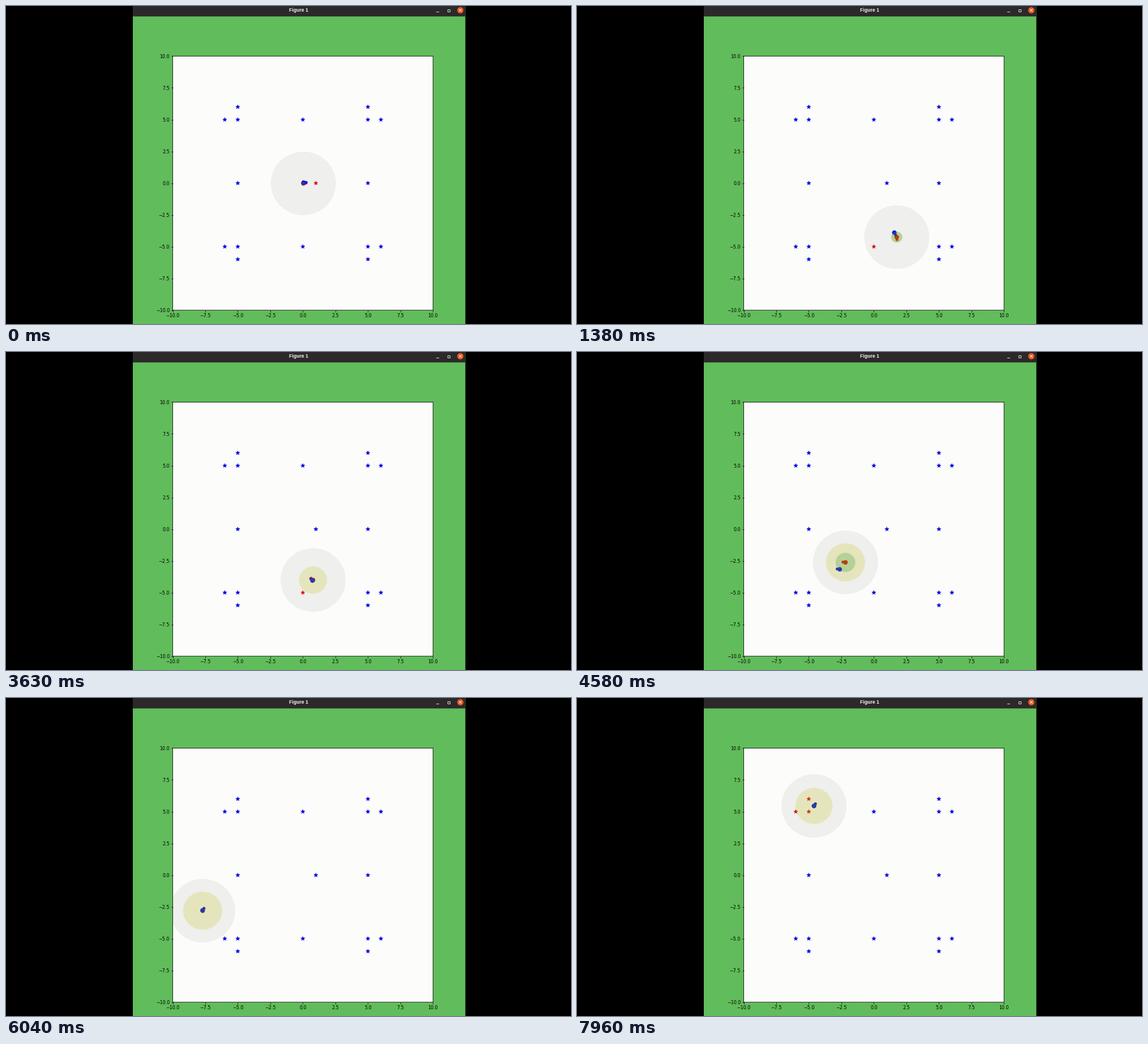
These frames come from a looping animation (998x561 px, 8 s). A matplotlib script:

```python
import numpy as np
import matplotlib.pyplot as plt
from matplotlib.animation import FuncAnimation
from matplotlib.patches import Circle, Rectangle
from matplotlib.ticker import MultipleLocator

W, H, DPI = 998, 561, 100
PX = 72 / DPI            # points per pixel
FRAMES, STEP = 200, 40
RANGE, SPEED, NOSE = 2.5, 4.6, 0.2

plt.rcParams["font.family"] = "DejaVu Sans"
fig = plt.figure(figsize=(W / DPI, H / DPI), dpi=DPI, facecolor="black")

# Desktop window
desk = fig.add_axes([0, 0, 1, 1])
desk.set(xlim=(0, W), ylim=(H, 0))
desk.axis("off")
for height, color in ((H, "#61bc5b"), (18.4, "#2b2929")):
    desk.add_patch(Rectangle((224, 0), 587.4, height, color=color, lw=0, snap=False))
desk.text(516.8, 7.6, "Figure 1", color="#f4f4f2", size=8.6 * PX, weight="bold",
          family="Liberation Sans", ha="center", va="center")
desk.plot([760, 764.5], [9.5, 9.5], color="#dddddd", lw=PX)
desk.add_patch(Rectangle((780.5, 5.5), 4, 4, fill=False, ec="#dddddd", lw=PX))
desk.add_patch(Circle((802.5, 7.5), 5.6, color="#e95420", lw=0))
for s in (-1, 1):
    desk.plot([800.5, 804.5], [7.5 - 2 * s, 7.5 + 2 * s], color="white", lw=0.9 * PX)

# Map
ax = fig.add_axes([294.5 / W, 24.5 / H, 459.7 / W, 448 / H], facecolor="#fcfcfa")
ax.set(xlim=(-10, 10), ylim=(-10, 10))
ax.tick_params(length=2.8 * PX, width=0.8 * PX, pad=2.8 * PX, labelsize=8 * PX)
for axis in (ax.xaxis, ax.yaxis):
    axis.set_major_locator(MultipleLocator(2.5))
for spine in ax.spines.values():
    spine.set(linewidth=0.8 * PX, snap=False)

corners = [(sx * x, sy * y) for sx in (-1, 1) for sy in (-1, 1)
           for x, y in ((5, 5), (6, 5), (5, 6))]
stars = np.array(corners + [(5, 0), (-5, 0), (0, 5), (0, -5), (1, 0)], float)
landmarks = ax.scatter(*stars.T, s=(7.2 * PX) ** 2, marker="*", lw=0.8 * PX, zorder=2)

# True pose in red, estimated pose in blue, each a body and a nose
robots = ax.scatter(np.zeros(4), np.zeros(4), s=(np.array([8, 5, 8, 5]) * PX) ** 2,
                    c=["red", "red", "blue", "blue"], lw=0, zorder=3)
sensor, spread, error = (
    ax.add_patch(Circle((0, 0), 1, fc=color, alpha=alpha, lw=0, zorder=4))
    for color, alpha in (("gray", 0.1), ("y", 0.2), ("g", 0.2)))

# Waypoints: time (s), x, y, heading (deg)
path = np.array([
    (0.00, 0.04, -0.02, 5),
    (1.36, 1.76, -4.25, -85),
    (2.60, 2.89, -7.02, 125),
    (4.56, -2.18, -2.62, 172),
    (6.04, -7.70, -2.80, 57),
    (7.08, -5.93, 1.68, 50),
    (7.96, -4.60, 5.45, 57)])


def pose(t):
    """Cubic Hermite position and heading along the waypoints."""
    i = int(np.clip(np.searchsorted(path[:, 0], t, "right") - 1, 0, len(path) - 2))
    (t0, *p0, a0), (t1, *p1, a1) = path[i], path[i + 1]
    p0, p1, dt = np.array(p0), np.array(p1), t1 - t0
    a = np.radians([a0, a1])
    m0, m1 = SPEED * dt * np.column_stack([np.cos(a), np.sin(a)])
    u = (t - t0) / dt
    c2, c3 = 3 * (p1 - p0) - 2 * m0 - m1, 2 * (p0 - p1) + m0 + m1
    pos = p0 + u * (m0 + u * (c2 + u * c3))
    vel = m0 + u * (2 * c2 + 3 * u * c3)
    return pos, np.arctan2(vel[1], vel[0])


def bump(t, peak, width):
    return np.exp(-((t - peak) / width) ** 2)


def drift(t):
    """The estimate slips away twice, with a slight wobble in between."""
    wobble = 0.06 * np.array([np.sin(3 * t + 0.3), np.cos(t)])
    slips = (bump(t, 1.36, 0.3) * np.array([-0.13, 0.34])
             + bump(t, 4.56, 0.4) * np.array([-0.48, -0.54]))
    return slips + wobble * np.cos(np.pi * t / 16)


def uncertainty(t):
    u = np.clip((t - 2.6) / 1.9, 0, 1)
    jump = 0.92 * u * u * (3 - 2 * u)
    return 0.1 + 0.24 * min(t, 2) + jump - 0.04 * max(t - 6, 0)


def body_and_nose(pos, angle):
    return [pos, pos + NOSE * np.array([np.cos(angle), np.sin(angle)])]


def draw(frame):
    t = frame * STEP / 1000
    pos, angle = pose(t)
    slip = drift(t)
    turn = 0.38 * bump(t, 1.36, 0.3)
    robots.set_offsets(body_and_nose(pos, angle) + body_and_nose(pos + slip, angle + turn))
    for circle, r in ((sensor, RANGE), (spread, uncertainty(t)),
                      (error, max(1.08 * np.hypot(*slip), 0.17))):
        circle.set_center(pos)
        circle.set_radius(r)
    seen = np.hypot(*(stars - pos).T) < RANGE
    landmarks.set_color(["#e60010" if s else "#0000e6" for s in seen])
    return landmarks, robots, sensor, spread, error


anim = FuncAnimation(fig, draw, frames=FRAMES, interval=STEP,
                     init_func=lambda: draw(0), repeat=True, repeat_delay=0)
plt.show()
```
